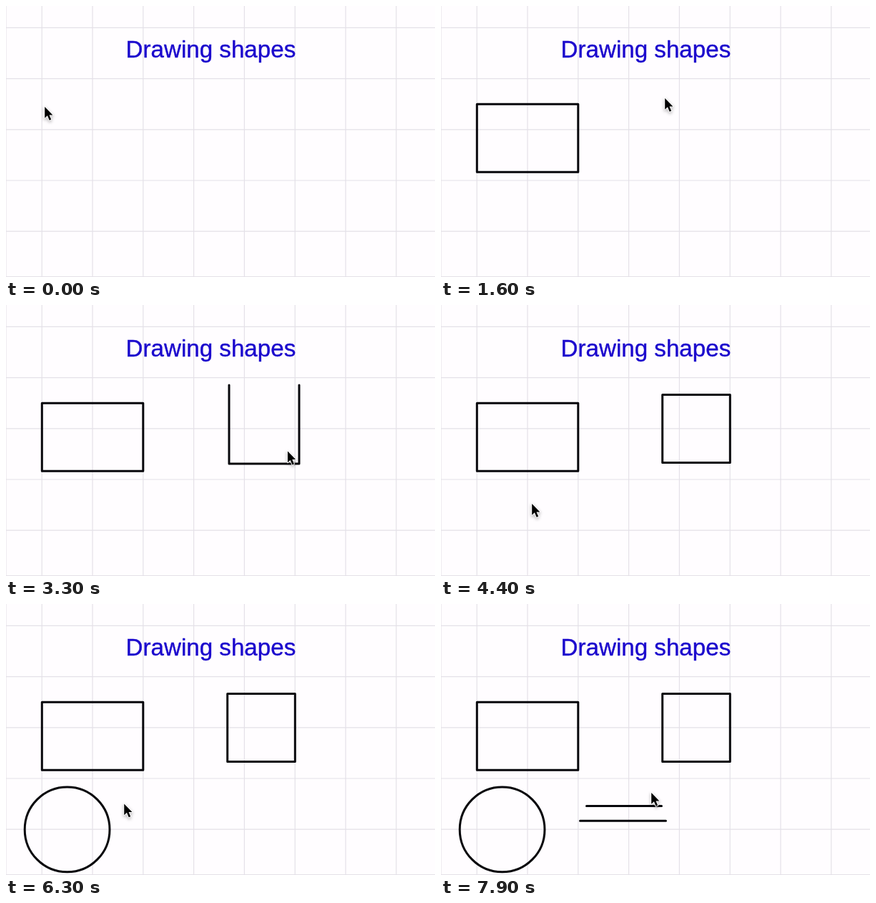
Write an HTML page with a canvas that moves like this. It is 600 px wide and 379 px high and loops after 8000 ms.

```html
<!DOCTYPE html>
<html lang="en">
<head>
<meta charset="utf-8">
<title>Drawing shapes</title>
<style>
html, body { margin: 0; width: 100%; height: 100%; overflow: hidden; background: #fffdff; }
canvas { display: block; }
</style>
</head>
<body>
<canvas id="board" width="600" height="379"></canvas>
<script>
const ctx = document.getElementById('board').getContext('2d');
const LOOP = 8000, STEP = 100, LAG = 25;
const INK = '#08080c', PAPER = '#fffdff';

const clamp = v => Math.max(0, Math.min(1, v));
const ease = p => p * p * (3 - 2 * p);
const mix = (a, b, p) => [a[0] + (b[0] - a[0]) * p, a[1] + (b[1] - a[1]) * p];
const along = (a, b) => p => mix(a, b, p);

// One pen stroke; at(p) gives the pen position for p from 0 to 1
const stroke = (start, end, at, parts = 1) => ({ start, end, at, parts });
const stop = (time, x, y) => stroke(time, time, () => [x, y]);

// Left, bottom, right and top side, one per slot
function boxStrokes(start, slot, x, y, w, h) {
  const tl = [x, y], tr = [x + w, y], bl = [x, y + h], br = [x + w, y + h];
  return [[tl, bl], [bl, br], [tr, br], [tl, tr]].map(([a, b], i) =>
    stroke(start + i * slot, start + (i + 0.58) * slot, along(a, b)));
}

// Uneven hand-drawn loop, counter-clockwise from the top
function roughLoop(p) {
  const a = 4.41 - p * 2 * Math.PI;
  const r = 1.01 + 0.06 * Math.cos(3 * (a - 2.3));
  return [84 + 60 * r * Math.cos(a), 314 + 48 * r * Math.sin(a)];
}

function line(start, y, x1, x2) {
  return {
    strokes: [stroke(start, start + 300, along([x1, y], [x2, y]))],
    snap: start + 450,
    clean() { ctx.moveTo(x1, y); ctx.lineTo(x2, y); }
  };
}

// Rough strokes turn into the clean shape at the snap time
const shapes = [
  { strokes: boxStrokes(100, 290, 53, 139, 142, 96), snap: 1300,
    clean() { ctx.rect(50.3, 137.3, 141.5, 95); } },
  { strokes: boxStrokes(1900, 520, 312, 112, 98, 110), snap: 3900,
    clean() { ctx.rect(309.7, 125.4, 94.6, 95); } },
  { strokes: [stroke(5300, 6024, roughLoop, 28)], snap: 6250,
    clean() { ctx.moveTo(145, 315.4); ctx.arc(85.6, 315.4, 59.4, 0, 2 * Math.PI); } },
  line(6450, 282.5, 203.5, 308.5),
  line(7150, 303.3, 194.5, 314.5)
];

// Pointer rests between the strokes
const stops = [
  stop(0, 53, 139), stop(1600, 312, 127), stop(4400, 126, 276),
  stop(5100, ...roughLoop(0)), stop(7000, 227, 304), stop(7900, 293, 262)
];

const moves = [...shapes.flatMap(s => s.strokes), ...stops].sort((a, b) => a.start - b.start);

const progress = (m, t) => m.end > m.start ? clamp((t - m.start) / (m.end - m.start)) : 1;

function pointerAt(t) {
  const i = moves.findLastIndex(m => m.start <= t);
  const now = moves[i], next = moves[i + 1];
  const here = now.at(progress(now, t));
  if (t <= now.end || !next) return here;
  return mix(here, next.at(0), ease((t - now.end) / (next.start - now.end)));
}

function drawStroke(s, t) {
  const p = progress(s, t);
  ctx.moveTo(...s.at(0));
  for (let i = 1; i < p * s.parts; i++) ctx.lineTo(...s.at(i / s.parts));
  ctx.lineTo(...s.at(p));
}

function drawGrid() {
  ctx.strokeStyle = '#e4e1e8';
  ctx.lineWidth = 1.2;
  ctx.beginPath();
  for (let x = 50.2; x < 600; x += 70.8) { ctx.moveTo(x, 0); ctx.lineTo(x, 379); }
  for (let y = 30.4; y < 379; y += 71.2) { ctx.moveTo(0, y); ctx.lineTo(600, y); }
  ctx.moveTo(0, 0);
  ctx.lineTo(0, 378.5);
  ctx.lineTo(600, 378.5);
  ctx.stroke();
}

function drawTitle() {
  ctx.font = '33.15px "Liberation Sans", Arial, sans-serif';
  ctx.fillStyle = ctx.strokeStyle = '#1b08cd';
  ctx.lineWidth = 0.4;
  ctx.fillText('Drawing shapes', 167.6, 72.4);
  ctx.strokeText('Drawing shapes', 167.6, 72.4);
}

const arrow = new Path2D('M0 0V17L4 13.4 7 20.4 9.8 19.2 6.9 12.4H12.2Z');

function drawPointer([x, y]) {
  ctx.save();
  ctx.translate(x + 1.2, y + 2);
  ctx.scale(0.92, 0.92);
  ctx.shadowColor = 'rgba(0,0,0,.35)';
  ctx.shadowBlur = 4;
  ctx.shadowOffsetY = 2;
  ctx.strokeStyle = '#fff';
  ctx.lineWidth = 2;
  ctx.stroke(arrow);
  ctx.shadowColor = 'transparent';
  ctx.fillStyle = '#000';
  ctx.fill(arrow);
  ctx.restore();
}

function draw(t) {
  ctx.fillStyle = PAPER;
  ctx.fillRect(0, 0, 600, 379);
  drawGrid();
  drawTitle();

  ctx.strokeStyle = INK;
  ctx.lineWidth = 3;
  ctx.lineCap = ctx.lineJoin = 'round';
  ctx.beginPath();
  for (const shape of shapes) {
    if (t >= shape.snap) shape.clean();
    else shape.strokes.filter(s => t >= s.start).forEach(s => drawStroke(s, t - LAG));
  }
  ctx.stroke();

  drawPointer(pointerAt(t));
}

const origin = performance.now();
function frame() {
  const t = (performance.now() - origin) % LOOP;
  draw(Math.floor(t / STEP) * STEP);
  requestAnimationFrame(frame);
}
frame();
</script>
</body>
</html>
```
